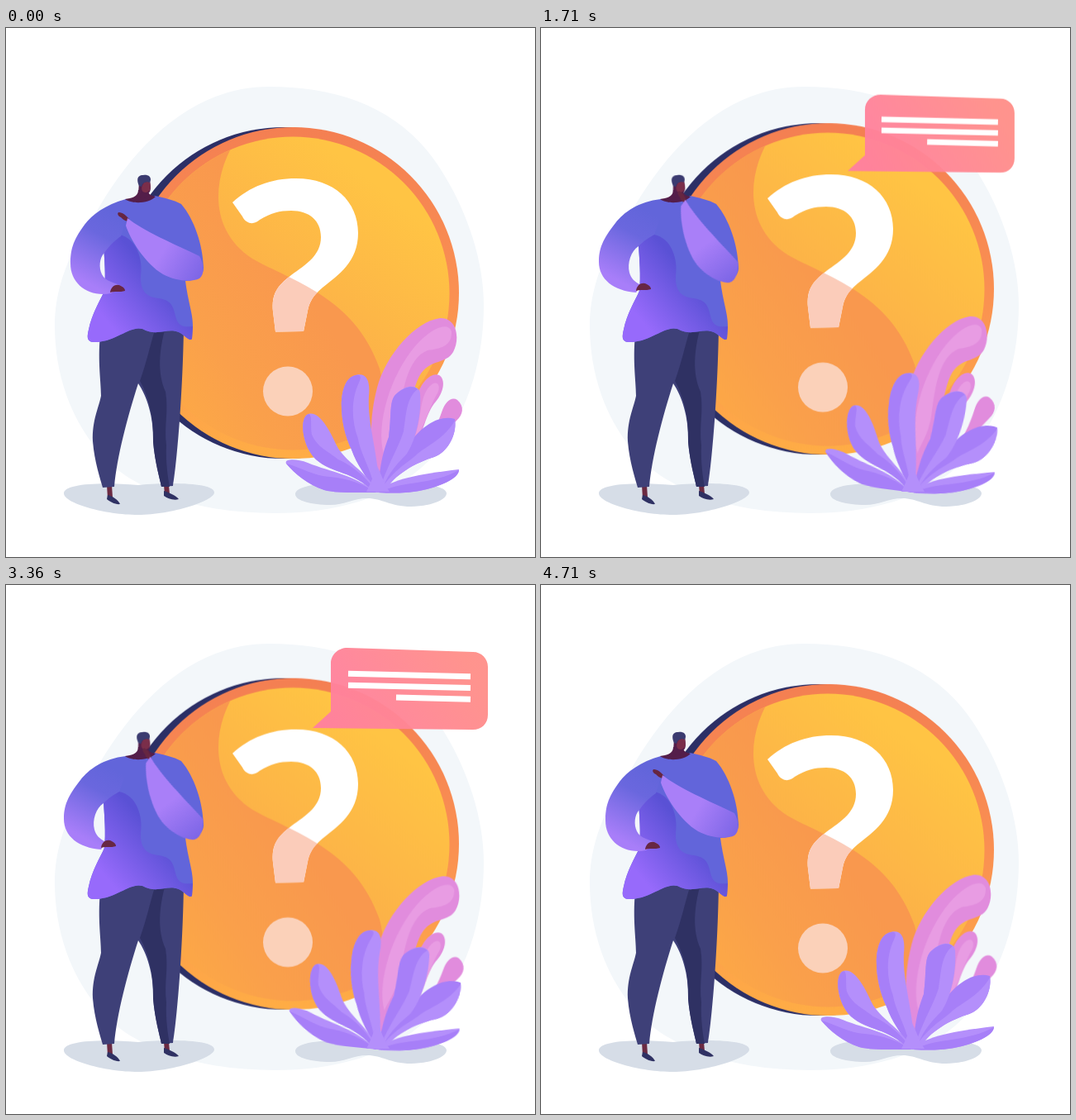
These frames come from a looping animation (640x640 px, 4780 ms). An HTML page:

```html
<!DOCTYPE html>
<html lang="en">
<head>
<meta charset="utf-8">
<title>Thinking it over</title>
<style>
html, body { margin: 0; width: 100%; height: 100%; overflow: hidden; background: #fff; }
svg { display: block; width: 100vw; height: 100vh; }

:root { --loop: 4780ms; --sine: cubic-bezier(.364, 0, .636, 1); }

.coin { animation: bob 1195ms var(--sine) infinite alternate; }
@keyframes bob { to { transform: translateY(-8px); } }

.pink, .leaf { transform-origin: 450px 562px; }
.pink { animation: sway 1195ms -597.5ms var(--sine) infinite alternate; }
@keyframes sway { from { transform: rotate(-1.75deg); } to { transform: rotate(1.75deg); } }
.leaf { animation: lean 2390ms var(--sine) infinite alternate; }
@keyframes lean { to { transform: rotate(var(--a)); } }

.bubble { transform-origin: 371px 173px; animation: pop var(--loop) ease-in-out infinite; }
@keyframes pop {
  0% { transform: rotate(-20deg) scale(0); animation-timing-function: linear; }
  5.2% { transform: rotate(-13deg) scale(.55); animation-timing-function: linear; }
  10.46% { transform: rotate(-6.2deg) scale(1.035); animation-timing-function: ease-out; }
  13.4% { transform: rotate(-1deg) scale(1.09); }
  18.8% { transform: scale(.99); }
  26.2% { transform: scale(1.05); }
  35.2% { transform: scale(.952); }
  46%, 94.5% { transform: scale(1); animation-timing-function: ease-in; }
  97.1% { transform: scale(.6); animation-timing-function: linear; }
  98.5%, 100% { transform: scale(0); }
}

.arm { animation: elbow var(--loop) ease-in-out infinite; }
@keyframes elbow {
  0%, 98.3%, 100% { d: path("M145 207C120 214 104 226 95 238C80 258 78 270 78 285C78 310 100 326 127 321L141 313C133 308 120 307 116 298C112 290 113 278 119 272C126 262 133 256 139 252L152 209Z"); }
  11.3%, 88.5% { d: path("M145 207C112 210 98 222 87 234C70 252 65 265 65 279C65 302 82 315 107 318L113 309C107 305 103 300 101 293C99 280 105 267 118 260C125 255 130 252 136 248L152 209Z"); }
  23.8%, 80.8% { d: path("M145 207C118 210 100 223 90 236C74 256 70 268 70 283C70 304 88 318 115 320L121 311C113 307 109 303 107 296C104 284 109 270 118 264C125 257 130 254 137 250L152 209Z"); }
}
.hip-hand { animation: hip var(--loop) ease-in-out infinite; }
@keyframes hip {
  0%, 98.3%, 100% { transform: none; }
  11.3%, 88.5% { transform: translate(-18px, -4px); }
  23.8%, 80.8% { transform: translate(-11px, -2px); }
}
.forearm { transform-origin: 218px 290px; animation: raise var(--loop) ease-in-out infinite; }
@keyframes raise {
  0%, 98.3%, 100% { transform: none; }
  10.8% { transform: rotate(27deg); }
  23.8%, 82% { transform: rotate(22deg); }
}
.head { transform-origin: 168px 206px; animation: nod var(--loop) ease-in-out infinite; }
@keyframes nod {
  0%, 98.3%, 100% { transform: none; }
  11% { transform: rotate(-6deg); }
  24% { transform: rotate(-5deg); }
  36% { transform: rotate(-3deg); }
  58% { transform: rotate(-4deg); }
  82% { transform: rotate(-1deg); }
}
</style>
</head>
<body>
<svg viewBox="0 0 640 640">
  <defs>
    <linearGradient id="rim" gradientUnits="userSpaceOnUse" x1="330" y1="120" x2="330" y2="521">
      <stop stop-color="#f47f52"/><stop offset=".5" stop-color="#fa9052"/><stop offset="1" stop-color="#ffad45"/>
    </linearGradient>
    <linearGradient id="face" gradientUnits="userSpaceOnUse" x1="290" y1="400" x2="450" y2="190">
      <stop stop-color="#fba94a"/><stop offset="1" stop-color="#ffc444"/>
    </linearGradient>
    <linearGradient id="wave" gradientUnits="userSpaceOnUse" x1="410" y1="390" x2="230" y2="510">
      <stop stop-color="#f9984e"/><stop offset=".6" stop-color="#faa04b"/><stop offset="1" stop-color="#fda946"/>
    </linearGradient>
    <linearGradient id="talk" gradientUnits="userSpaceOnUse" x1="550" y1="80" x2="400" y2="180">
      <stop stop-color="#ff8f89"/><stop offset="1" stop-color="#ff7fa0"/>
    </linearGradient>
    <linearGradient id="shirt" gradientUnits="userSpaceOnUse" x1="178" y1="298" x2="118" y2="350">
      <stop stop-color="#5a51d5"/><stop offset="1" stop-color="#976afb"/>
    </linearGradient>
    <linearGradient id="sleeve" gradientUnits="userSpaceOnUse" x1="135" y1="225" x2="92" y2="305">
      <stop stop-color="#6265da"/><stop offset=".35" stop-color="#6a67de"/><stop offset="1" stop-color="#a87ef9"/>
    </linearGradient>
    <linearGradient id="cuff" gradientUnits="userSpaceOnUse" x1="190" y1="270" x2="240" y2="300">
      <stop stop-color="#a97ff8"/><stop offset="1" stop-color="#7a64e5"/>
    </linearGradient>
    <clipPath id="disc"><circle cx="347" cy="321" r="189.5"/></clipPath>
    <path id="swirl" d="M288 122C252 165 238 240 298 279C345 306 422 325 452 412C462 448 455 500 430 530H140V122Z"/>
    <clipPath id="low"><use href="#swirl"/></clipPath>
    <path id="ask" d="M274 211C295 192 320 182 351 182C397 182 426 210 426 248C426 283 402 299 383 314C371 324 367 332 365 342L360 367L326 367.5L323 343C321 322 328 312 345 299C363 286 381 275 381 253C381 233 367 221 345 221C331 221 320 224 307 232C302 236 297 238 291 234C289 233 287 230 286 228Z"/>
  </defs>

  <path fill="#f3f7fa" d="M318 71C400 71 475 95 522 165C560 222 578 285 578 335C578 400 560 470 510 525C465 570 395 587 325 587C260 587 200 575 150 545C95 510 59 440 59 360C59 310 80 265 108 225C150 150 220 71 318 71Z"/>
  <g fill="#d6dde7">
    <path d="M70 563C70 552 110 549 160 553C205 549 252 551 252 562C252 572 200 589 160 589C120 589 70 575 70 563Z"/>
    <path d="M350 564C350 552 390 549 440 552C490 548 533 552 533 563C533 572 510 579 490 579C465 579 455 569 437 569C420 569 410 577 392 577C370 577 350 572 350 564Z"/>
  </g>

  <g class="coin">
    <circle cx="336" cy="320.5" r="200.5" fill="#2c2f66"/>
    <circle cx="347.5" cy="320.5" r="200.5" fill="url(#rim)"/>
    <circle cx="347" cy="321" r="189.5" fill="url(#face)"/>
    <g clip-path="url(#disc)"><use href="#swirl" fill="url(#wave)"/></g>
    <use href="#ask" fill="#fff"/>
    <g clip-path="url(#low)"><path fill="#fbccba" d="M320 300H400V368H320Z" clip-path="url(#askClip)"/></g>
    <clipPath id="askClip"><use href="#ask"/></clipPath>
    <circle cx="341" cy="439.5" r="30" fill="#fbd1b9"/>
  </g>

  <g class="bubble">
    <path fill="url(#talk)" fill-opacity=".96" d="M371 173L393 153V95C393 84 402 76 413 76L565 81C575 81 583 89 583 99V157C583 168 575 175 565 175Z"/>
    <path stroke="#fff" stroke-width="7" d="M414 107.3L562 110.8M414 121.3L562 124.6M472 136L562 138.3"/>
  </g>

  <g class="pink">
    <g fill="#e18cdd">
      <path d="M485 530C510 505 520 485 527 465C532 450 540 446 546 450C555 458 553 468 545 475C530 490 505 515 490 530Z"/>
      <path d="M470 540C488 510 490 480 496 450C501 428 515 416 524 420C532 425 530 440 520 452C508 465 505 490 490 520Z"/>
      <path d="M447 530C440 500 440 470 449 435C460 395 495 355 525 351C545 350 550 375 541 392C532 407 515 400 502 418C488 440 490 480 455 545Z"/>
    </g>
    <g fill="#e89ce3">
      <path d="M496 490C503 470 500 448 512 434C521 424 527 432 522 442C512 458 508 480 490 508Z"/>
      <path d="M457 515C447 480 465 420 495 385C515 362 535 355 539 367C540 385 525 388 510 390C485 400 480 440 475 470C470 495 460 505 457 515Z"/>
    </g>
  </g>

  <g fill="#b48ffb">
    <g class="leaf" style="--a:7.5deg">
      <path fill="#a77ff8" d="M450 562C460 530 475 520 490 500C505 480 525 468 543 473C546 490 535 515 515 520C490 528 465 545 458 562Z"/>
      <path d="M452 562C466 536 484 528 498 515C510 505 530 497 543 475C546 490 535 515 515 520C490 528 465 545 458 562Z"/>
    </g>
    <g class="leaf" style="--a:10deg">
      <path d="M447 562C435 540 425 530 418 510C403 480 400 430 420 421C435 415 441 425 439 445C437 480 450 510 452 562Z"/>
      <path fill="#a77ff8" d="M447 562C435 540 425 530 418 510C403 480 400 430 420 421C428 418 431 420 427 429C417 450 418 475 426 497C429 515 440 530 448 562Z"/>
    </g>
    <g class="leaf" style="--a:9.5deg">
      <path d="M445 562C420 535 395 540 375 522C357 505 355 470 366 467C380 463 393 490 400 505C410 525 435 535 450 562Z"/>
      <path fill="#a77ff8" d="M445 562C420 535 395 540 375 522C357 505 355 470 366 467C371 468 368 480 370 492C377 508 390 512 402 522C420 530 438 545 448 562Z"/>
    </g>
    <g class="leaf" style="--a:8.5deg">
      <path d="M447 562C455 540 455 520 463 495C467 465 463 450 473 442C485 430 500 432 501 442C503 470 495 500 485 515C470 530 458 545 455 562Z"/>
      <path fill="#a77ff8" d="M449 562C453 535 453 520 463 495C467 465 463 450 473 442C485 432 494 433 498 437C484 447 484 470 481 488C474 510 463 525 453 556Z"/>
    </g>
    <g class="leaf" style="--a:9deg">
      <path d="M448 562C425 562 400 563 385 559C365 552 350 540 339 527C336 521 352 521 365 526C395 538 420 540 448 562Z"/>
      <path fill="#a77ff8" d="M448 562C425 562 400 563 385 559C365 552 350 540 339 527C358 532 372 542 392 543C415 545 432 552 448 562Z"/>
    </g>
    <g class="leaf" style="--a:2.3deg">
      <path d="M450 562C465 545 500 540 548 534C548 545 525 555 500 560C480 563 470 563 450 562Z"/>
      <path fill="#a77ff8" d="M456 560C480 548 515 553 548 535C548 545 525 555 500 560C480 563 470 563 450 562Z"/>
    </g>
    <path d="M436 561C441 552 445 540 449 530C454 540 458 552 464 561Z"/>
  </g>

  <g fill="#6b2a42"><path d="M122 553H128L129 568L123 569ZM191 553H197L198 564L192 565Z"/></g>
  <g fill="#2f3163">
    <path d="M123 565C128 566 136 571 138 576C133 577 125 573 122 570Z"/>
    <path d="M191 560C197 562 206 566 209 570C203 572 195 569 191 566Z"/>
  </g>
  <path fill="#3e4078" d="M115 362C110 400 115 425 115 445C112 460 104 475 105 500C107 525 114 545 117 556L131 555C134 520 147 470 160 430C170 445 179 470 178 500C180 525 186 545 188 555L202 554C207 525 214 440 215 362Z"/>
  <path fill="#2f3163" d="M181 362H193C185 390 183 418 193 440C197 465 191 480 194 505C193 525 196 545 198 555L188 555C186 545 180 525 178 500C179 470 172 445 162 427C170 405 174 385 181 362Z"/>

  <path fill="#6265da" d="M145 207C155 211 172 211 180 203C190 205 203 208 212 213C228 232 238 262 239 290C239 303 226 306 217 306C220 330 226 345 226 360L225 376C222 380 217 372 209 368C195 362 183 374 165 364C150 360 135 378 110 380C97 381 98 374 100 365C104 345 114 330 119 318C121 300 119 280 118 262Z"/>
  <path fill="url(#shirt)" d="M118 262C122 254 129 250 137 250C158 254 166 280 163 300C162 320 172 326 185 327C206 330 202 345 208 356C213 363 219 361 226 361L225 376C222 380 217 372 209 368C195 362 183 374 165 364C150 360 135 378 110 380C97 381 98 374 100 365C104 345 114 330 119 318C121 300 119 280 118 262Z"/>
  <path class="arm" fill="url(#sleeve)" d="M145 207C120 214 104 226 95 238C80 258 78 270 78 285C78 310 100 326 127 321L141 313C133 308 120 307 116 298C112 290 113 278 119 272C126 262 133 256 139 252L152 209Z"/>
  <path class="hip-hand" fill="#672744" d="M126 320C127 312 134 309 139 312C143 314 144 316 144 318C138 320 130 318 126 320Z"/>

  <path fill="#541e4a" d="M160 196C160 204 152 206 144 207C152 213 172 213 181 204C175 203 172 201 172 196Z"/>
  <g class="head">
    <path fill="#541e4a" d="M161 186L160 202C164 207 170 206 172 200C176 198 175 192 174 185Z"/>
    <path fill="#7a2e4a" d="M167 187C162 193 164 200 170 199C176 197 175 192 174 185Z"/>
    <path fill="#3b3b70" d="M161 191C157 182 160 178 166 178C173 177 177 181 174 187C170 185 165 187 164 192Z"/>
  </g>

  <g class="forearm">
    <path fill="#662641" d="M149 231C145 227 142 223 136 223C134 225 136 228 139 229C141 231 143 233 147 234Z"/>
    <path fill="url(#cuff)" d="M147 230C165 245 205 262 234 276C240 286 240 299 234 303C224 308 205 306 190 298C168 285 150 255 145 239Z"/>
  </g>
</svg>
</body>
</html>
```
